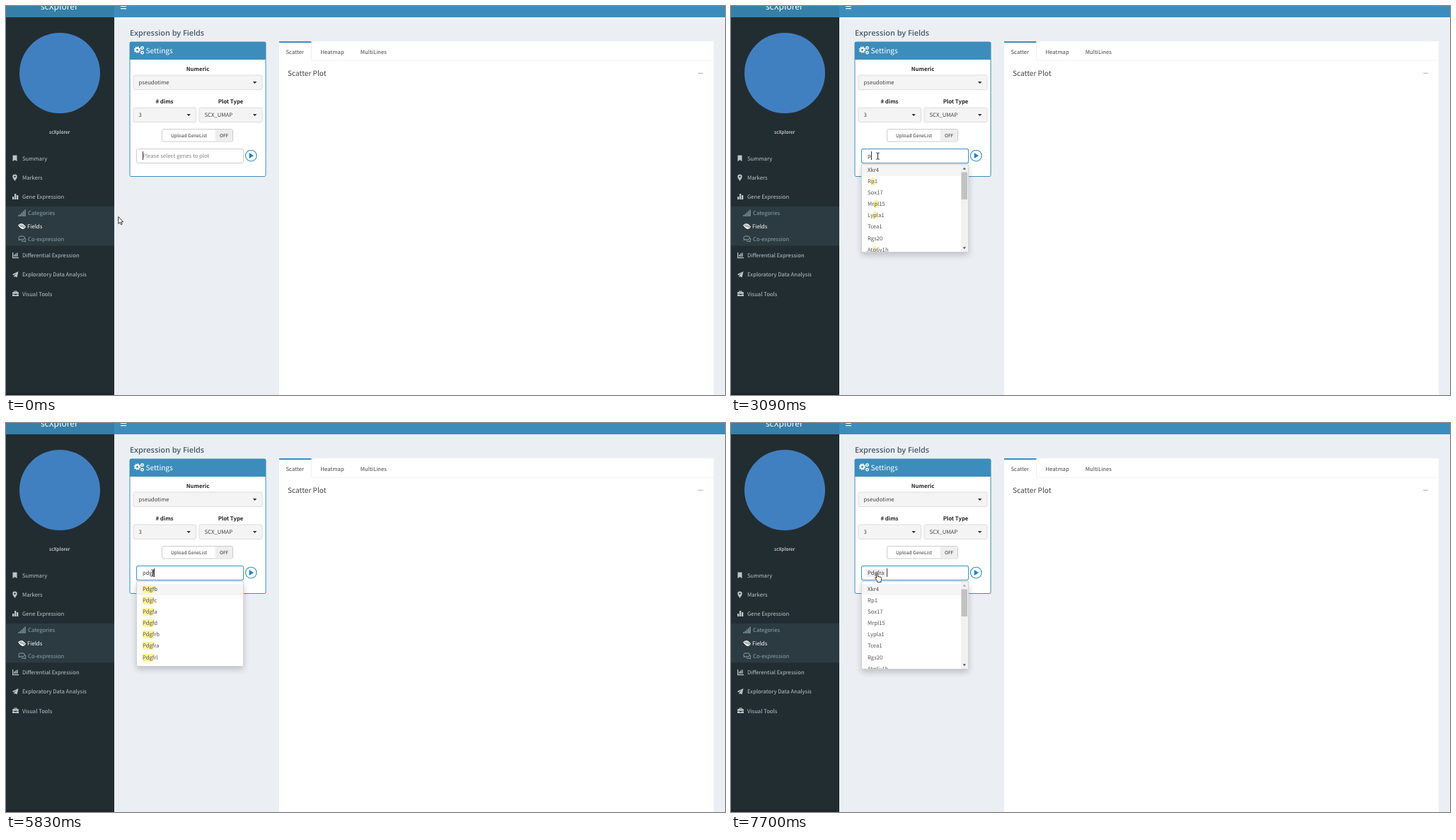
Write an HTML page that moves like this. It is 1016x551 px and loops after 8000 ms.

```html
<!DOCTYPE html>
<html lang="en">
<head>
<meta charset="utf-8">
<title>Expression by Fields</title>
<style>
html, body { margin: 0; width: 100%; height: 100%; overflow: hidden; background: #ebeff4; }
body { position: relative; font: 7.72px "Noto Sans CJK JP", "Noto Sans CJK SC", "Noto Sans CJK", Lato, sans-serif; text-rendering: geometricPrecision; color: #555; }
svg { position: absolute; left: 0; top: 0; }
.menu { fill: #b8c7ce; font-weight: 500; }
.sub { fill: #8aa4af; }
.line { fill: none; stroke: #8aa4af; }
.label { font-weight: 700; fill: #222; text-anchor: middle; }
.select { fill: #f4f4f4; stroke: #ddd; }
#field, #list { position: absolute; left: 184px; width: 152px; box-sizing: border-box; white-space: pre; }
#field { top: 201.5px; height: 21px; line-height: 19px; border: 1px solid #ccc; border-radius: 3px; padding-left: 8px; background: #fff; color: #444; }
#field.focus { border-color: #4596cf; box-shadow: 0 0 1px #4596cf; }
#field em { font-style: normal; color: #858585; }
#field b { font-weight: 400; background: #efefef; padding: 0 2px; margin: 0 1.5px 0 -2px; }
#caret { position: absolute; width: 1px; height: 12px; margin-top: 3.5px; background: #333; }
#list { top: 224px; max-height: 125px; overflow: hidden; background: #fff; border: 1px solid #d4d4d4; border-radius: 0 0 2px 2px; padding: 3px 0; box-shadow: 0 4px 8px rgba(0,0,0,.2); }
#list p { margin: 0; padding-left: 8px; height: 16.1px; line-height: 16.1px; }
#list p:first-child { background: #f5f5f5; color: #444; }
mark { background: #fff39a; color: inherit; }
</style>
</head>
<body>
<svg width="1016" height="551">
  <path fill="#3c8dbc" d="M153 0h863v16H153z"/>
  <path fill="#222d32" d="M0 16h153v535H0z"/>
  <path fill="#367fa9" d="M0 0h153v16H0z"/>
  <path fill="#1c2529" d="M0 548h150v3H0z"/>
  <path fill="#fff" d="M162 0h8v1h-8zM162 3h8v1.2h-8z"/>
  <text x="49" y="5" font-size="12" fill="#fff">scXplorer</text>
  <circle cx="76" cy="95" r="57" fill="#4180c0"/>
  <text x="61" y="181" font-size="6.7" fill="#fff">scXplorer</text>

  <path fill="#2c3b41" d="M0 284h153v55.500H0z"/>
  <g class="menu">
    <path d="M9.500 211.500h6v8.500l-3-2-3 2z"/>
    <path fill-rule="evenodd" d="M12.500 248c-1-2-3.200-4-3.200-6.300a3.200 3.200 0 0 1 6.400 0c0 2.300-2.200 4.300-3.200 6.300zm0-7.600a1.200 1.200 0 1 0 .01 0z"/>
    <path d="M9 270h2.300v4H9zM12 266h2.300v8H12zM15 268h2.300v6H15z"/>
    <path d="M9 349h1.200v7H18v1.200H9zM11.200 352h1.300v3h-1.300zM13.200 350.500h1.300v4.500h-1.300zM15.300 349.500h1.300v5.500h-1.300z"/>
    <path d="M9 380l8.500-4-2 8.500-2.600-1.500-1.400 1.500v-2.500l3-3.500-4 3z"/>
    <path fill-rule="evenodd" d="M9 406l1-1h1.500v-1.500h4v1.500H17l1 1v1.700H9zM12.500 404.500v.7h2v-.7zM9 408.500h3v.8h3v-.8h3v2.500H9z"/>
    <text x="23" y="219">Summary</text>
    <text x="23" y="246.200">Markers</text>
    <text x="23" y="273.400">Gene Expression</text>
    <text x="23" y="356.200">Differential Expression</text>
    <text x="23" y="383.400">Exploratory Data Analysis</text>
    <text x="23" y="410.600">Visual Tools</text>
    <text x="30" y="314.800" fill="#fff">Fields</text>
  </g>
  <path class="sub" d="M17.500 296h1.300v2h-1.300zM19.700 294.500h1.300v3.500h-1.300zM21.900 292.500h1.300v5.500h-1.300zM24.100 290.500h1.300v7.500h-1.300zM26.300 288.500h1.300v9.500h-1.300z"/>
  <path fill="#fff" d="M17 310.500q4-4 8-1l3 3q-2 4-5 3.500-3-1-6-5.500z"/>
  <path fill="none" stroke="#2c3b41" stroke-width=".7" d="M18.500 310.500q4-1.500 8.500 2.500M20 312.300q3-.8 6 2"/>
  <path class="line" d="M20 326h3.500a2.800 2.300 0 0 1 0 4.800H20l-2 .9.500-1.600A2.500 2.500 0 0 1 20 326zM26 328.500a2.300 2.300 0 0 1 1 4l.5 1.500-2-.8h-2.500l-1.500-1"/>
  <g class="sub">
    <text x="31" y="296.300">Categories</text>
    <text x="31" y="333.300">Co-expression</text>
  </g>

  <text x="175" y="41.500" font-size="10.900" font-weight="600" fill="#4b5a69" font-family="Open Sans, sans-serif">Expression by Fields</text>
  <rect x="175" y="51" width="192" height="190.500" rx="2" fill="#fff" stroke="#3c8dbc"/>
  <path fill="#3c8dbc" d="M175 51h192v25H175z"/>
  <g fill="none" stroke="#fff">
    <circle cx="185.500" cy="62" r="2.600" stroke-width="2"/>
    <circle cx="185.500" cy="62" r="4" stroke-width="1.500" stroke-dasharray="1.570"/>
    <circle cx="192.500" cy="59.500" r="1.700" stroke-width="1.500"/>
    <circle cx="192.500" cy="66" r="1.700" stroke-width="1.500"/>
  </g>
  <text x="197.500" y="66.700" font-size="10.100" fill="#fff">Settings</text>
  <g class="label">
    <text x="271" y="91.700">Numeric</text>
    <text x="224" y="137.500"># dims</text>
    <text x="317.500" y="137.500">Plot Type</text>
  </g>
  <g class="select">
    <rect x="180" y="98" width="182" height="20.500" rx="2"/>
    <rect x="180" y="144" width="88.500" height="20.500" rx="2"/>
    <rect x="273" y="144" width="89" height="20.500" rx="2"/>
  </g>
  <path fill="#333" d="M348.800 107h5.600l-2.800 3zM255.300 153h5.600l-2.800 3zM348.800 153h5.600l-2.800 3z"/>
  <g fill="#444">
    <text x="187.500" y="111.200">pseudotime</text>
    <text x="187.500" y="157.200">3</text>
    <text x="280.500" y="157.200">SCX_UMAP</text>
  </g>
  <rect x="220.500" y="174.500" width="100" height="17.500" rx="2" fill="#fff" stroke="#ccc"/>
  <path fill="#eee" d="M295.500 175h24.500v16.500h-24.500z"/>
  <g fill="#333" font-size="6.650">
    <text x="233" y="185.600">Upload GeneList</text>
    <text x="302" y="185.600">OFF</text>
  </g>
  <circle cx="346.300" cy="212" r="7.800" fill="#fff" stroke="#3c8dbc" stroke-width="1.100"/>
  <path fill="#1f83c5" d="M343.600 208l6.400 4-6.400 4z"/>

  <path fill="#fff" d="M386 50h614v501H386z"/>
  <path fill="#3c8dbc" d="M386 50h45.500v2H386z"/>
  <path fill="none" stroke="#f0f0f0" d="M431.500 52v25H1000"/>
  <g fill="#444">
    <text x="395.500" y="68">Scatter</text>
    <text x="444.500" y="68">Heatmap</text>
    <text x="500.800" y="68">MultiLines</text>
    <text x="398" y="98.700" font-size="10.100">Scatter Plot</text>
  </g>
  <path fill="#aaa" d="M978 94.700h7v1h-7z"/>
</svg>

<div id="field"></div>
<div id="list"></div>

<svg width="1016" height="551">
  <g id="bar">
    <path fill="#f1f1f1" d="M325 225h10v123h-10z"/>
    <path fill="#c1c1c1" d="M325.500 235.500h8.500v38.500h-8.500z"/>
    <path id="up" d="M327.500 231.500h4.600l-2.300-2.800z"/>
    <path fill="#505050" d="M327.500 341.500h4.600l-2.300 2.800z"/>
  </g>
  <circle id="click" cx="207.300" cy="212.500" r="7" fill="#f7ea20" fill-opacity=".7"/>
  <g id="pointer">
    <path fill="#fff" stroke="#222" stroke-width=".9" d="M.5.500v10l2.300-2.100 1.500 3.300 1.600-.7-1.500-3.200h3z"/>
    <path fill="none" stroke="#222" d="M-2.200-4.500h1.700l.5.500.5-.5h1.700M0-4v8M-2.200 4.500h1.700l.5-.5.5.5h1.700"/>
    <path fill="#fff" stroke="#222" stroke-width=".9" d="M-2 .8q1-1 2 0v4l4.500 1q1 .5.900 2L4.500 11v1.800H-.8V11L-4 7.200q0-1.500 1.400-.9l.6.700z"/>
  </g>
</svg>

<script>
const LOOP = 8000;
const $ = id => document.getElementById(id);
const genes = 'Xkr4 Rp1 Sox17 Mrpl15 Lypla1 Tcea1 Rgs20 Atp6v1h';
const family = 'Pdgfb Pdgfc Pdgfa Pdgfd Pdgfrb Pdgfra Pdgfrl';

const blinks = [0, 530, 1060, 2030, 2560, 3570, 4030, 4570, 4970, 5500, 5700, 7170, 7700];
const typing = [[0, ''], [3090, 'p'], [4030, 'pd'], [4970, 'pdg'], [5700, 'pdgf'], [6160, 'pdgfr'], [6640, 'pdgfra']];
// start time, items, highlighted query, scroll offset
const lists = [
  [0, ''],
  [1480, genes, 'p', 3.4],
  [3220, 'Pf4 Pam Pkm Pgr Pnp Pbk Pxk Pzp', 'p', 3.4],
  [4300, 'Pdc Pdcl Pdk1 Pdp1 Pdpn Pdxk Pdia6 Pdcd5', 'pd', 3.4],
  [5170, family, 'pdg', 0],
  [5830, family, 'pdgf', 0],
  [6160, 'Pdgfrb Pdgfra Pdgfrl', 'pdgfr', 0],
  [6840, 'Pdgfra', 'pdgfra', 0],
  [7500, genes, '', 0]
];

const at = (rows, t) => rows.filter(row => row[0] <= t).pop();
const show = (el, on) => el.style.display = on ? '' : 'none';
const setHtml = (el, html) => { if (el.shown !== html) el.innerHTML = el.shown = html; };

function drawField(t) {
  const on = blinks.filter(b => b <= t).length % 2;
  const caret = on ? '<i id="caret"></i>' : '';
  const text = at(typing, t)[1];
  setHtml($('field'), t >= 7500 ? '<b>Pdgfra</b>' + caret
    : text ? text + caret
    : caret + '<em>Please select genes to plot</em>');
  $('field').className = t >= 1480 ? 'focus' : '';
}

function drawList(t) {
  const [, items, query, scroll] = at(lists, t);
  const names = items.split(' ');
  const mark = name => query ? name.replace(new RegExp(query, 'i'), '<mark>$&</mark>') : name;
  setHtml($('list'), names.map(name => `<p>${mark(name)}</p>`).join(''));
  show($('list'), items);
  show($('bar'), names.length > 7);
  $('list').scrollTop = 0;
  $('list').style.paddingTop = scroll ? 0 : '3px';
  $('up').setAttribute('fill', scroll ? '#505050' : '#a3a3a3');
}

function drawPointer(t) {
  const step = Math.max(0, Math.min(7, Math.floor((t - 800) / 68) + 1)) / 7;
  const ease = step * step * (3 - 2 * step);
  const x = 158.3 + 49.2 * ease, y = 298 - 85.4 * ease;
  const kind = t >= 7500 ? 2 : y < 222 ? 1 : 0;
  [...$('pointer').children].forEach((shape, i) => show(shape, i === kind));
  $('pointer').setAttribute('transform', `translate(${x} ${y})`);
  show($('click'), t >= 1480 && t < 1630);
}

const start = performance.now();
function draw() {
  const t = (performance.now() - start) % LOOP;
  drawField(t);
  drawList(t);
  drawPointer(t);
  requestAnimationFrame(draw);
}
draw();
</script>
</body>
</html>
```
